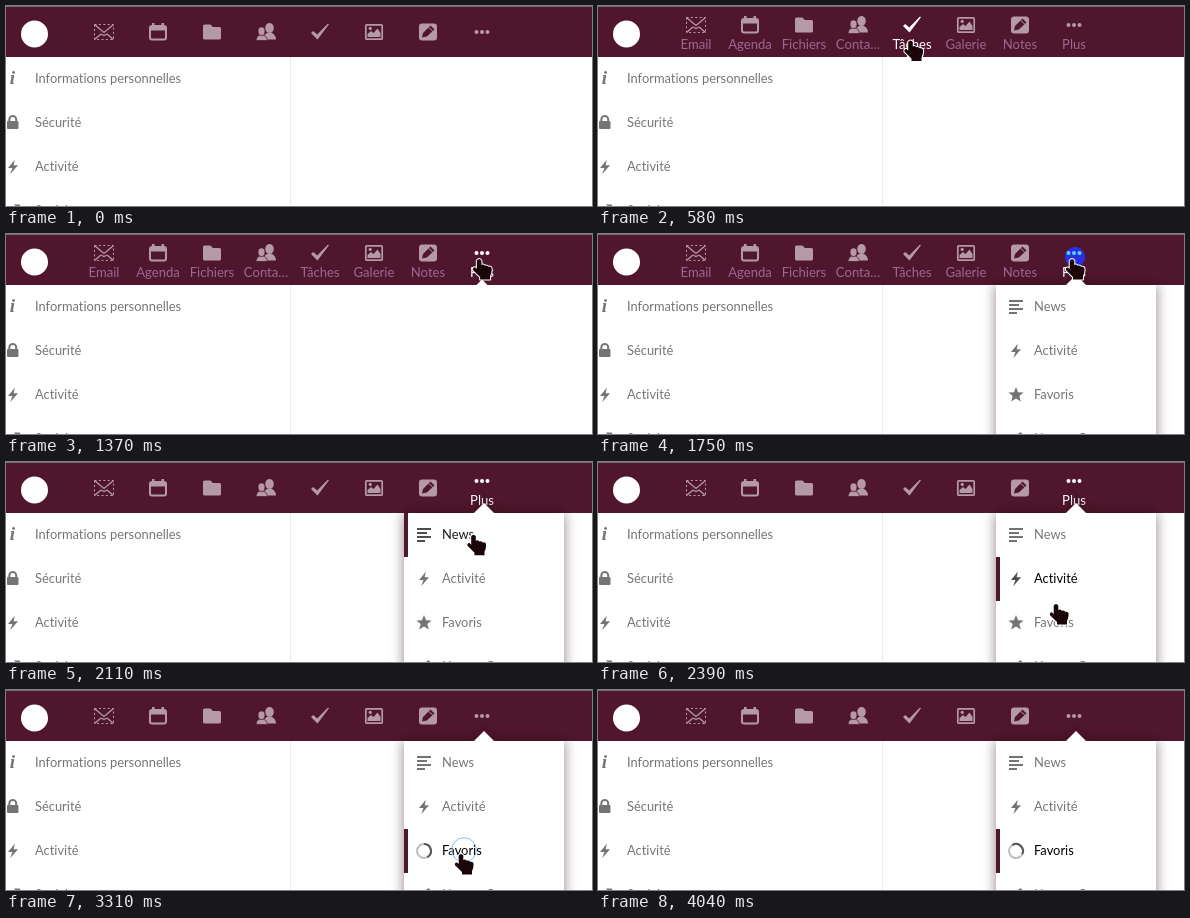
These frames come from a looping animation (586 by 200 pixels, 5.43 s). An HTML page:

```html
<!DOCTYPE html>
<html lang="fr">
<head>
<meta charset="utf-8">
<title>Menu des applications</title>
<style>
  html, body { margin: 0; width: 100%; height: 100%; overflow: hidden; background: #fff; }
  svg { display: block; }
  text {
    font-family: Lato, "Open Sans", sans-serif;
    font-size: 12.9px;
    font-variant-ligatures: none;
  }
  .label { font-size: 13.1px; text-anchor: middle; }
  .line { fill: none; stroke: currentColor; }
</style>
</head>
<body>
<svg id="stage" width="586" height="200" viewBox="0 0 586 200">
  <defs>
    <filter id="shadow" x="-20%" y="-20%" width="140%" height="140%">
      <feDropShadow dx="0" dy="0" stdDeviation="6.5" flood-color="#1c0810" flood-opacity=".5"/>
    </filter>
    <path id="bolt" d="M1.8-7.2L-5 1H-.6L-2.8 7.2L5-1.8H.7Z"/>
  </defs>
  <rect width="586" height="200" fill="#fff"/>
  <path d="M284.5 51V200" stroke="#ebebeb"/>
  <g id="side"></g>
  <rect width="586" height="51" fill="#50162d"/>
  <rect width="586" height="1" fill="#75697a"/>
  <circle cx="28.5" cy="28" r="13.5" fill="#fff"/>
  <g id="apps"></g>
  <g id="menu">
    <path d="M398 51H468L478 41L488 51H558V230H398Z" fill="#fff" filter="url(#shadow)"/>
    <rect id="bar" x="398" width="4" height="44" fill="#50162d"/>
    <g id="rows"></g>
    <g id="spinner" fill="none" stroke-width="2">
      <circle r="7" stroke="#bdbdbd"/>
      <path d="M0-7A7 7 0 0 1 3.5 6.06" stroke="#555"/>
    </g>
  </g>
  <circle id="click"/>
  <g id="clickDots" fill="#55d3f2"></g>
  <path id="hand" fill="#1a0509" stroke="#fff" stroke-width="2" paint-order="stroke" stroke-linejoin="round"
    d="M-2.3 1.6Q0-1.6 2.3 1.6V6Q4.2 4.8 5.8 6.8Q7.6 5.8 9.2 7.8Q12.5 7 12.6 10.5Q12.6 14 11 17V20.5H1V18L-6 11.2Q-6.6 8.2-4 8.4L-2.3 10Z"/>
</svg>
<script>
const LOOP = 5430, FADE = 100;
const OPEN = 1670, PICK = 3020, CLICK_TIME = 310;
const $ = id => document.getElementById(id);
const clamp = v => Math.max(0, Math.min(1, v));
const smooth = u => u * u * (3 - 2 * u);

const dots = [-5.5, 0, 5.5].map(x => `<circle cx="${x}" r="2"/>`).join('');

// Header icons, centred on 0,0
const apps = [
  ['Email', `<path class="line" stroke-dasharray="2 2.4" d="M-9.5-7.5H9.5V7.5H-9.5Z"/>
    <path class="line" stroke-width="1.3" d="M-9.5-7.5L-3-2M9.5-7.5L3-2M-9.5 7.5L-3 2M9.5 7.5L3 2"/>
    <path class="line" stroke-width="1.2" d="M-3-2L0 .5L3-2M-3 2L0 3.5L3 2"/>`],
  ['Agenda', `<rect class="line" x="-8" y="-6" width="16" height="13.5" rx="2" stroke-width="2"/>
    <path d="M-8-6H8V-1.5H-8ZM-6-9H-3.5V-5H-6ZM3.5-9H6V-5H3.5Z"/>`],
  ['Fichiers', '<path d="M-9-6Q-9-7.5-7.5-7.5H-1.5L.8-5H7.5Q9-5 9-3.5V6Q9 7.5 7.5 7.5H-7.5Q-9 7.5-9 6Z"/>'],
  ['Conta…', `<ellipse cx="3.5" cy="-4" rx="4.3" ry="5"/>
    <path d="M-3 7.5Q-3 3 1.5.5H5.5Q10 3 10 7.5Z"/>
    <g stroke="#50162d" stroke-width=".7"><path d="M-10 8.5Q-10 4.5-6.5 3H-2.5Q1.5 4.5 1.5 8.5Z"/>
    <ellipse cx="-4.5" cy="-.8" rx="3.5" ry="4.3"/></g>`],
  ['Tâches', '<path d="M-9 1L-6.8-1L-2.8 2.6L8-8.5L9-7.7L-2.5 7.5Z"/>'],
  ['Galerie', `<rect class="line" x="-8.2" y="-7.2" width="16.4" height="14.4" rx="1" stroke-width="1.7"/>
    <path d="M-6.5 5V2L-3-1L-.5 1L3.5-3.5L6.5 1V5Z"/><circle cx="-3.8" cy="-3.6" r="1.6"/>`],
  ['Notes', `<rect x="-9" y="-8.5" width="18" height="17" rx="3"/>
    <path d="M-6 5.5L-5 1L2.5-6.5L6.5-2.5L-1.2 4.6Z" fill="#50162d"/>
    <path d="M.6-4.8L4.8-.8" stroke="currentColor"/>`],
  ['Plus', dots]
];
const appX = i => 98 + 54 * i;
const rowY = i => 73 + 44 * i;

const sideItems = [
  ['Informations personnelles', '<text x="-3.3" y="5" style="font:italic bold 19px Liberation Serif,serif">i</text>'],
  ['Sécurité', `<rect x="-6" y="-2" width="11.5" height="8" rx="1"/>
    <path class="line" d="M-3.7-1V-3.5A3.4 3.4 0 0 1 3.2-3.5V-1" stroke-width="2"/>`],
  ['Activité', '<use href="#bolt"/>'],
  ['Social', '<path d="M-7-5H-1V4H-7ZM1-6.5H7V0L5-2L2 1L0-1L3-4Z"/>']
];
const star = Array.from({ length: 10 }, (_, k) => {
  const a = k * Math.PI / 5, r = k % 2 ? 3.5 : 8;
  return `${(r * Math.sin(a)).toFixed(2)},${(-r * Math.cos(a)).toFixed(2)}`;
}).join(' ');
const menuItems = [
  ['News', '<path class="line" d="M-7-6H7M-7-2H3M-7 2H7M-7 6H1" stroke-width="2"/>'],
  ['Activité', '<use href="#bolt"/>'],
  ['Favoris', `<polygon id="star" points="${star}"/>`],
  ['Heures Co', '<path d="M0-4L5-7L6-5L2 0Z"/>']
];

const list = (items, iconX, textX) => items.map(([name, icon], i) =>
  `<g opacity=".54"><g color="#000" transform="translate(${iconX} ${rowY(i)})">${icon}</g>
  <text x="${textX}" y="${rowY(i) + 4}">${name}</text></g>`).join('');

$('side').innerHTML = list(sideItems, 7, 29);
$('rows').innerHTML = list(menuItems, 418, 436);
$('clickDots').innerHTML = dots;
$('apps').innerHTML = apps.map(([name, icon], i) => `<g transform="translate(${appX(i)} 0)">
  <g class="icon" fill="currentColor">${icon}</g>
  <text class="label" y="43">${name}</text>
  <path class="arrow" d="M-5.5 51L0 45.5L5.5 51Z" fill="#fff"/></g>`).join('');

const sideRows = [...$('side').children];
const menuRows = [...$('rows').children];
const appParts = [...$('apps').children].map(g => ({
  icon: g.querySelector('.icon'),
  label: g.querySelector('.label'),
  arrow: g.querySelector('.arrow')
}));

// Pointer stops: time, x, y
const stops = [
  [200, 190, 206], [540, 312.5, 34.5], [720, 312.5, 34.5], [870, 416, 22.5], [1000, 416, 22.5],
  [1400, 474, 25], [1800, 474, 25], [2590, 455, 164], [3600, 455, 164], [4030, 460, 212]
];

function pointer(t) {
  const k = stops.findIndex(s => s[0] > t);
  if (k < 1) return { x: 460, y: 300 };
  const [t0, x0, y0] = stops[k - 1], [t1, x1, y1] = stops[k];
  const s = smooth((t - t0) / (t1 - t0));
  return { x: x0 + (x1 - x0) * s, y: y0 + (y1 - y0) * s };
}

// Share of the last FADE ms during which a test held
function fade(t, test) {
  let n = 0;
  for (let k = 0; k < 10; k++) {
    const at = t - k * FADE / 10;
    if (test(pointer(at), at)) n++;
  }
  return n / 10;
}

const inHeader = p => p.y < 51;
const inRow = (p, i) => Math.abs(p.y - 4 - rowY(i)) < 22;
const mix = (a, b, u) => Math.round(a + (b - a) * u);
const tint = (from, u) => `rgb(${from.map(c => mix(c, 255, u))})`;

function drawApps(t) {
  const shown = fade(t, inHeader);
  const kept = t < OPEN ? 0 : 1 - clamp((t - PICK - 40) / FADE);
  appParts.forEach(({ icon, label, arrow }, i) => {
    let hot = fade(t, p => inHeader(p) && Math.abs(p.x - appX(i)) < 27);
    let up = shown;
    if (i === 7) {
      hot = Math.max(hot, kept);
      up = Math.max(up, kept);
    }
    icon.setAttribute('transform', `translate(0 ${26 - 7 * up})`);
    icon.setAttribute('color', tint([181, 153, 165], hot));
    label.setAttribute('fill', tint([156, 104, 146], hot));
    label.setAttribute('opacity', up);
    arrow.setAttribute('opacity', hot);
  });
}

function drawMenu(t) {
  const open = t >= OPEN + 40;
  $('menu').style.display = open ? '' : 'none';
  let active = -1;
  menuRows.forEach((row, i) => {
    let hot = i > 2 ? 0 : fade(t, (p, at) => at > OPEN && inRow(p, i));
    if (i === 2 && t >= PICK) hot = 1;
    if (hot > .5) active = i;
    row.setAttribute('opacity', .54 + .46 * hot);
    row.firstElementChild.setAttribute('opacity', 1 - .3 * hot);
  });
  $('bar').setAttribute('y', active < 0 ? 300 : rowY(active) - 22);

  const busy = t >= PICK + 120;
  $('star').style.display = busy ? 'none' : '';
  $('spinner').style.display = busy ? '' : 'none';
  const turn = (Math.min(t, 4040) - 3310) / 800 * 360;
  $('spinner').setAttribute('transform', `translate(418 161) rotate(${turn})`);
}

function drawClick(t) {
  const first = t < PICK;
  const u = (t - (first ? OPEN : PICK)) / CLICK_TIME;
  const on = u >= 0 && u <= 1;
  const c = $('click');
  c.style.display = on ? '' : 'none';
  $('clickDots').style.display = on && first ? '' : 'none';
  if (!on) return;
  const x = first ? 477 : 458, y = first ? 23 : 160;
  c.setAttribute('cx', x);
  c.setAttribute('cy', y);
  c.setAttribute('r', 12.3 * (1 - (1 - u) ** 5));
  c.setAttribute('fill', first ? '#2a30e0' : '#8cc8ea');
  c.setAttribute('fill-opacity', (first ? 1 : .6) * clamp(1 - (u - .3) / .4));
  c.setAttribute('stroke', first ? '#2a30e0' : '#7fc0e6');
  $('clickDots').setAttribute('transform', 'translate(476 19)');
}

function draw(t) {
  sideRows.forEach((row, i) => {
    const hot = fade(t, p => p.x < 284 && p.y < 206 && inRow(p, i));
    row.setAttribute('opacity', .54 + .46 * hot);
  });
  drawApps(t);
  drawMenu(t);
  drawClick(t);
  const p = pointer(t);
  $('hand').setAttribute('transform', `translate(${p.x} ${p.y})`);
}

const start = performance.now();
function tick() {
  draw((performance.now() - start) % LOOP);
  requestAnimationFrame(tick);
}
draw(0);
requestAnimationFrame(tick);
</script>
</body>
</html>
```
